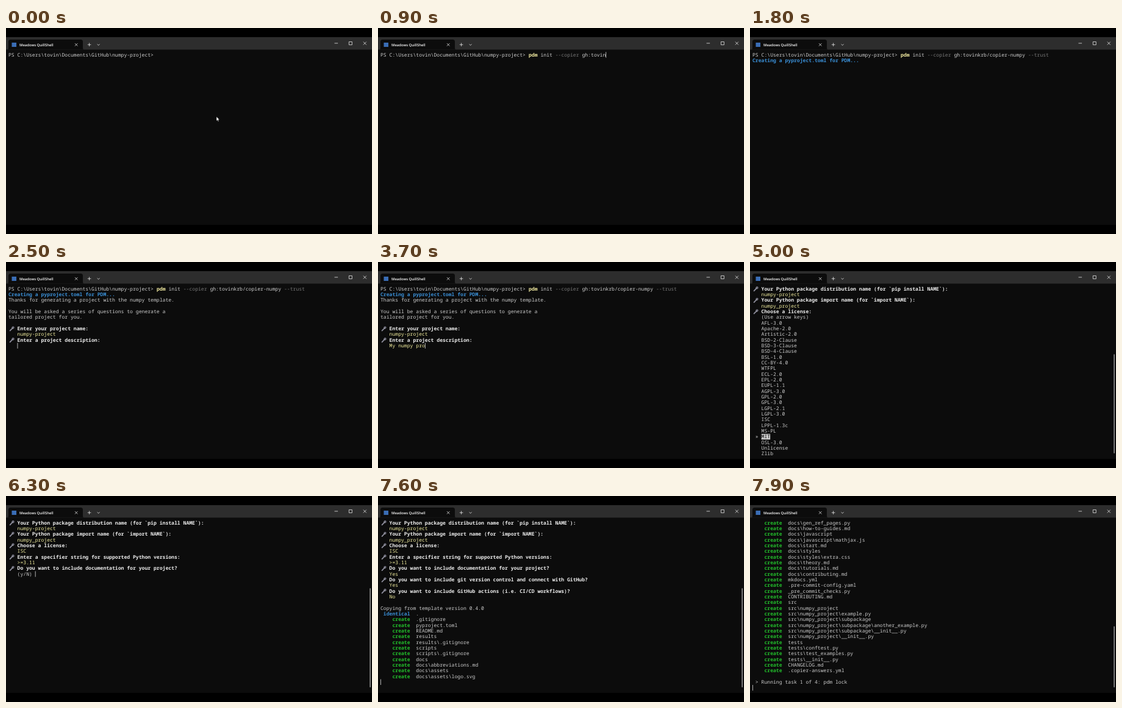
Animation of 600x338 px, one loop 8 s. Source, as an HTML page:

```html
<!DOCTYPE html>
<html lang="en">
<head>
<meta charset="utf-8">
<title>Terminal session</title>
<style>
  html, body { margin: 0; width: 100%; height: 100%; overflow: hidden; background: #000; }
  svg { display: block; width: 100%; height: 100%; }
  text { white-space: pre; text-rendering: geometricPrecision; }
  #screen text { font: 500 8.1px "Noto Sans Mono", "DejaVu Sans Mono", monospace; fill: #ccc; }
  #screen .q { font-weight: 700; fill: #ececec; }
  #screen .cmd { font-weight: 700; fill: #f4eda2; }
  #screen .ans { fill: #efeb9c; }
  #screen .dim { fill: #767676; }
  #screen .blue { font-weight: 600; fill: #3a8fd6; }
  #screen .green { font-weight: 700; fill: #23c02c; }
  #screen .sel { fill: #0c0c0c; }
  .title { font: 600 5.9px "Open Sans", "Noto Sans", sans-serif; fill: #fff; }
  .line { fill: none; stroke: #e8e8e8; stroke-width: .8; }
</style>
</head>
<body>
<svg viewBox="0 0 600 338">
  <defs>
    <g id="mic">
      <path d="M6.6 47.4L10.6 43.2" stroke="#8d8d9c" stroke-width="1.8" stroke-linecap="round"/>
      <circle cx="11.6" cy="42.2" r="2.1" fill="#6f6f7c"/>
      <path d="M9.6 42.2L11.7 44.4" stroke="#c4c4cf" stroke-width=".8"/>
    </g>
  </defs>
  <rect width="600" height="338"/>
  <rect y="15" width="600" height="308" fill="#0c0c0c"/>
  <rect y="15" width="600" height="20.5" fill="#2d2d2d"/>
  <path d="M2 35.5Q4 35.5 4 33V22.5Q4 19 7.5 19H122.5Q126 19 126 22.5V33Q126 35.5 128 35.5Z" fill="#0c0c0c"/>
  <rect x="9.5" y="24" width="7.5" height="7" fill="#3a6db5"/>
  <text class="title" x="22" y="29.7">Meadows QuillShell</text>
  <path class="line" d="M113 25.2l4.4 4.4m0-4.4l-4.4 4.4M133.8 27.3h5.6m-2.8-2.8v5.6M149.6 26.5l2 1.9 2-1.9"/>
  <path class="line" d="M538.5 25h5.6M562.3 22.6h5v5h-5zM585.8 22.6l5 5m0-5l-5 5"/>
  <g id="screen"></g>
  <rect id="bar" x="596.3" width="1.5" rx=".7" fill="#9c9c9c"/>
  <path id="mouse" d="M345 145.5v7l1.7-1.5 1.1 2.4 1.1-.5-1.1-2.3h2.2z" fill="#fff" stroke="#000" stroke-width=".4"/>
</svg>
<script>
const LOOP = 8000, VIEW = 30, CELL = 4.86, PITCH = 9.33, LEFT = 4, TOP = 39.4;
const NS = "http://www.w3.org/2000/svg";
const byId = id => document.getElementById(id);
const screen = byId("screen"), bar = byId("bar"), mouse = byId("mouse");

// Each row is a list of [style, text] pieces; the cursor sits on the last row.
const steps = [];
let rows = [], total = VIEW;

function snap(ms, cursor = null) {
  total = Math.max(total, rows.length);
  steps.push({ ms, cursor, total, rows: rows.slice() });
}

const last = row => { rows[rows.length - 1] = row; };
const ask = text => rows.push([["q", "   " + text]]);
const plain = text => [["", text]];
const answer = text => [["ans", "   " + text]];

function cut(parts, n) {
  return parts.map(([style, text]) => {
    const piece = text.slice(0, Math.max(0, n));
    n -= text.length;
    return [style, piece];
  });
}

function typed(ms, text) {
  last(answer(text));
  snap(ms, 3 + text.length);
}

function askWith(ms, question, preset = "") {
  ask(question);
  rows.push([]);
  typed(ms, preset);
}

function confirm(ms, question) {
  ask(question);
  rows.push(plain("   (y/N)"));
  snap(ms, 9);
}

// Command line
const prompt = String.raw`PS C:\Users\tovin\Documents\GitHub\numpy-project> `;
const command = [
  ["", prompt], ["cmd", "pdm"], ["", " init "], ["dim", "--copier"],
  ["", " gh:tovinkrb/copier-numpy "], ["dim", "--trust"]
];
rows = [plain(prompt)];
snap(0);
for (let k = 1; k <= 14; k++) {
  const n = k <= 9 ? 3 * k - 1 : 26 + Math.round(24 * (k - 9) / 5);
  last(cut(command, prompt.length + n));
  snap(k * 100, prompt.length + n);
}
rows.push([]);
snap(1500, 0);
last([["blue", "Creating a pyproject.toml for PDM..."]]);
rows.push([]);
snap(1700, 0);
snap(1800);

// Project questions
last(plain("Thanks for generating a project with the numpy template."));
rows.push([], plain("You will be asked a series of questions to generate a"),
  plain("tailored project for you."), []);
snap(2000);
askWith(2100, "Enter your project name:");
[5, 9, 13].forEach((n, i) => typed(2200 + i * 100, "numpy-project".slice(0, n)));
askWith(2500, "Enter a project description:");
[1, 3, 5, 8, 11, 13, 16, 15, 14, 13, 12].forEach((n, i) =>
  typed(2700 + i * 100, "My numpy projcet".slice(0, n)));
typed(3800, "My numpy proje");
typed(3900, "My numpy project");
askWith(4000, "Enter your full name:");
typed(4100, "Tovin");
typed(4200, "Tovin Krabel");
askWith(4300, "Enter your email:");
typed(4400, "tovin@mail.test");
askWith(4600, "Your Python package distribution name (for `pip install NAME`):", "numpy-project");
askWith(4800, "Your Python package import name (for `import NAME`):", "numpy_project");

// License menu
const licenses = ("AFL-3.0 Apache-2.0 Artistic-2.0 BSD-2-Clause BSD-3-Clause BSD-4-Clause BSL-1.0 " +
  "CC-BY-4.0 WTFPL ECL-2.0 EPL-2.0 EUPL-1.1 AGPL-3.0 GPL-2.0 GPL-3.0 LGPL-2.1 LGPL-3.0 ISC " +
  "LPPL-1.3c MS-PL MIT OSL-3.0 Unlicense Zlib").split(" ");
ask("Choose a license:");
const menuStart = rows.length;
[[4900, "MIT"], [5100, "MS-PL"], [5200, "LPPL-1.3c"], [5300, "ISC"]].forEach(([ms, pick]) => {
  rows.length = menuStart;
  rows.push(plain("   (Use arrow keys)"), ...licenses.map(name =>
    name === pick ? [["", " » "], ["sel", name]] : plain("   " + name)));
  snap(ms);
});
rows.length = menuStart;
rows.push(answer("ISC"));
askWith(5400, "Enter a specifier string for supported Python versions:", ">=3.11");

// Yes / no questions
confirm(5800, "Do you want to include documentation for your project?");
last(answer("Yes"));
snap(6400);
confirm(6500, "Do you want to include git version control and connect with GitHub?");
last(answer("Yes"));
confirm(7100, "Do you want to include GitHub actions (i.e. CI/CD workflows)?");
last(answer("No"));
rows.push([], []);
snap(7300, 0);

// Generated files
const files = String.raw`.gitignore pyproject.toml README.md results results\.gitignore scripts
  scripts\.gitignore docs docs\abbreviations.md docs\assets docs\assets\logo.svg
  docs\gen_ref_pages.py docs\how-to-guides.md docs\javascript docs\javascript\mathjax.js
  docs\start.md docs\styles docs\styles\extra.css docs\theory.md docs\tutorials.md
  docs\contributing.md mkdocs.yml .pre-commit-config.yaml _pre_commit_checks.py
  CONTRIBUTING.md src src\numpy_project src\numpy_project\example.py
  src\numpy_project\subpackage src\numpy_project\subpackage\another_example.py
  src\numpy_project\subpackage\__init__.py src\numpy_project\__init__.py tests
  tests\conftest.py tests\test_examples.py tests\__init__.py CHANGELOG.md
  .copier-answers.yml`.split(/\s+/);
last(plain("Copying from template version 0.4.0"));
rows.push([["blue", " identical"], ["", "  ."]], []);
snap(7400, 0);
let made = 0;
function create(upTo) {
  rows.pop();
  for (; made < upTo; made++) rows.push([["green", "    create"], ["", "  " + files[made]]]);
  rows.push([]);
}
[[7500, 5], [7600, 11], [7700, 20], [7800, 29]].forEach(([ms, n]) => {
  create(n);
  snap(ms, 0);
});
create(files.length);
rows.push(plain(" > Running task 1 of 4: pdm lock"), []);
snap(7900, 0);

// Drawing
function add(parent, tag, attrs, text) {
  const el = document.createElementNS(NS, tag);
  for (const key in attrs) el.setAttribute(key, attrs[key]);
  if (text) el.textContent = text;
  parent.append(el);
  return el;
}

const colX = col => LEFT + col * CELL;

function drawRow(row, i) {
  const y = TOP + i * PITCH;
  if (row.length && row[0][0] === "q") add(screen, "use", { href: "#mic", y: i * PITCH });
  let col = 0;
  for (const [style, text] of row) {
    if (style === "sel") {
      add(screen, "rect", { x: colX(col), y, width: text.length * CELL, height: PITCH, fill: "#ccc" });
    }
    if (text) add(screen, "text", { class: style, x: colX(col), y: y + 7.4 }, text);
    col += text.length;
  }
}

function draw(step) {
  const off = step.total - VIEW;
  screen.replaceChildren();
  step.rows.slice(off).forEach(drawRow);
  if (step.cursor !== null) {
    const y = TOP + (step.rows.length - 1 - off) * PITCH;
    add(screen, "rect", { x: colX(step.cursor), y, width: .8, height: PITCH, fill: "#ddd" });
  }
  const track = 244;
  bar.setAttribute("y", 70 + off / step.total * track);
  bar.setAttribute("height", off ? VIEW / step.total * track : 0);
  mouse.style.display = step.ms ? "none" : "";
}

let shown;
function tick() {
  const t = performance.now() % LOOP;
  const step = steps.findLast(s => s.ms <= t);
  if (step !== shown) draw(shown = step);
  requestAnimationFrame(tick);
}
tick();
</script>
</body>
</html>
```
